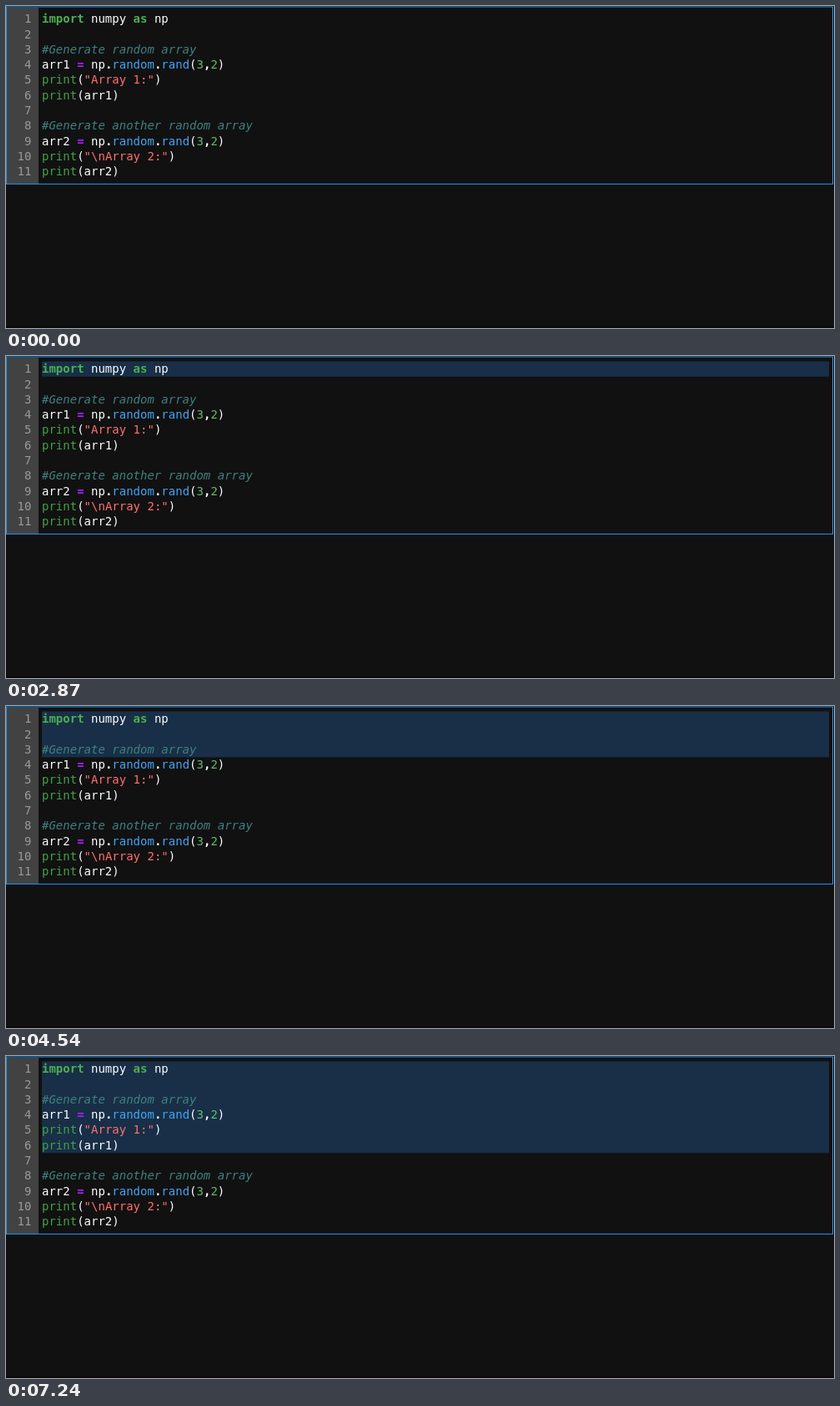
Animation of 993 by 386 pixels, one loop 8 s. Source, as an HTML page:

```html
<!DOCTYPE html>
<html lang="en">
<head>
<meta charset="utf-8">
<title>Code selection</title>
<style>
html, body { margin: 0; width: 100%; height: 100%; overflow: hidden; background: #111; }
svg { display: block; }
text { font: 14px "DejaVu Sans Mono", monospace; fill: #fff; white-space: pre; }
.no { fill: #999; text-anchor: end; }
.keyword { fill: #4caf50; font-weight: bold; }
.builtin { fill: #43a047; }
.operator { fill: #a2f; font-weight: bold; }
.comment { fill: #408080; font-style: italic; }
.string { fill: #ff7070; }
.number { fill: #66bb6a; }
.property { fill: #42a5f5; }
.dot { font-weight: bold; }
</style>
</head>
<body>
<svg id="stage" width="993" height="386">
  <rect width="993" height="386" fill="#111"/>
  <rect y="384" width="993" height="2" fill="#0a0a0a"/>
  <rect x="1" y="2" width="38" height="211" fill="#424242"/>
  <rect x=".5" y="1" width="991" height="212.4" fill="none" stroke="#2196f3"/>
  <rect id="selection" x="43" width="944" fill="#182f47"/>
  <g id="code"></g>
  <rect id="caret" x="43" width="1" fill="#fff"/>
</svg>
<script>
const LOOP = 8000, TOP = 6.45, PITCH = 18.31;
const BLINKS = [240, 770, 1250, 1790, 2330, 2870];
const SELECTS = [2870, 3650, 4540, 5440, 6400, 7240];

const lines = String.raw`import numpy as np

#Generate random array
arr1 = np.random.rand(3,2)
print("Array 1:")
print(arr1)

#Generate another random array
arr2 = np.random.rand(3,2)
print("\nArray 2:")
print(arr2)`.split("\n");

const token = new RegExp([
  "(?<comment>#.*)", '(?<string>"[^"]*")', "(?<keyword>\\b(?:import|as)\\b)",
  "(?<builtin>\\bprint\\b)", "(?<property>(?<=\\.)\\w+)", "(?<number>\\b\\d+)",
  "(?<operator>=)", "(?<dot>[.,])"
].join("|"), "g");

function highlight(line) {
  return line.replace(token, (match, ...rest) => {
    const groups = rest.at(-1);
    const kind = Object.keys(groups).find(key => groups[key]);
    return `<tspan class="${kind}">${match}</tspan>`;
  });
}

const find = id => document.getElementById(id);
const selection = find("selection"), caret = find("caret");

find("code").innerHTML = lines.map((line, i) => {
  const y = 20.2 + i * PITCH;
  return `<text class="no" x="30.4" y="${y}">${i + 1}</text>` +
    `<text x="43" y="${y}">${highlight(line)}</text>`;
}).join("");

for (const box of [selection, caret]) box.setAttribute("y", TOP);
caret.setAttribute("height", PITCH);

const passed = (times, t) => times.filter(time => t >= time).length;

function draw(now) {
  const t = now % LOOP;
  selection.setAttribute("height", passed(SELECTS, t) * PITCH);
  caret.setAttribute("opacity", passed(BLINKS, t) % 2);
  requestAnimationFrame(draw);
}
draw(0);
</script>
</body>
</html>
```
